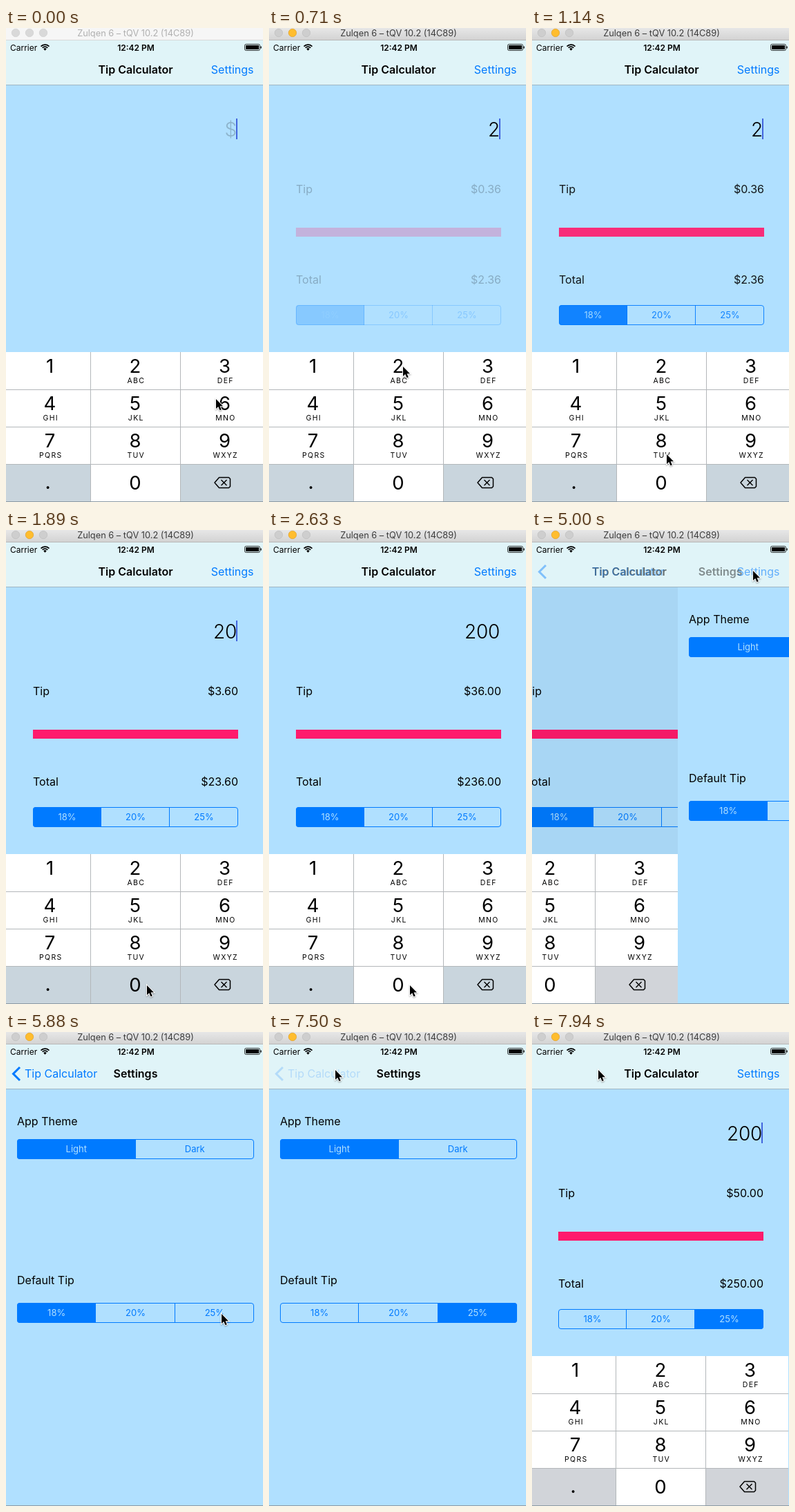
Recreate the animation shown at these times as an HTML page with a canvas. Size 372x686 px, loop 8 s.

```html
<!DOCTYPE html>
<html lang="en">
<head>
<meta charset="utf-8">
<title>Tip Calculator</title>
<style>
  html, body { margin: 0; width: 100%; height: 100%; overflow: hidden; }
  canvas { display: block; width: 372px; height: 686px; }
</style>
</head>
<body>
<canvas id="stage"></canvas>
<script>
const W = 372, H = 686, LOOP = 8000;
const canvas = document.getElementById('stage');
const ctx = canvas.getContext('2d');
const dpr = window.devicePixelRatio || 1;
canvas.width = W * dpr;
canvas.height = H * dpr;

const BG = '#b0e0ff', NAV = '#e0f4f8', BLUE = '#007aff', PINK = '#ff1b6c';

// The screen refreshes in bursts: [first, last, number of refreshes].
const bursts = [[0, 0, 1], [140, 1140, 8], [1290, 2040, 6], [2630, 2630, 1], [3070, 3070, 1],
  [3370, 4260, 7], [4560, 4710, 2], [5000, 6030, 8], [6170, 6320, 2], [6610, 7650, 8], [7790, 7940, 2]];
const refreshes = bursts.flatMap(([from, to, n]) =>
  Array.from({ length: n }, (_, i) => Math.floor((from + (to - from) * i / Math.max(1, n - 1)) / 10) * 10));

// Mouse pointer: [time, x, y]
const pointerPath = [[0, 304, 537], [280, 215, 500], [420, 194, 490], [710, 194, 490], [850, 194, 520],
  [1140, 195, 617], [1290, 202, 655], [1440, 204, 659], [3220, 204, 659], [3370, 212, 570],
  [3520, 240, 390], [3670, 275, 210], [3820, 296, 107], [3970, 312, 75], [4260, 320, 59],
  [5290, 320, 59], [5440, 318, 150], [5590, 315, 280], [5740, 312, 380], [5880, 312, 408],
  [6460, 312, 408], [6610, 302, 392], [6760, 262, 320], [6910, 205, 215], [7060, 150, 125],
  [7200, 110, 70], [7350, 96, 55], [LOOP, 96, 55]];

const during = (t, ...spans) => spans.some(([a, b]) => t >= a && t < b);
const clamp = v => Math.min(1, Math.max(0, v));

function pointerAt(t) {
  const i = Math.max(1, pointerPath.findIndex(p => p[0] >= t));
  const [t0, x0, y0] = pointerPath[i - 1], [t1, x1, y1] = pointerPath[i];
  const k = (t - t0) / (t1 - t0);
  return [Math.round(x0 + (x1 - x0) * k), Math.round(y0 + (y1 - y0) * k)];
}

// Critically damped slide, 0 to 1
function settle(ms) {
  const x = Math.max(0, ms) * 0.021;
  return 1 - (1 + x) * Math.exp(-x);
}

function rect(x, y, w, h, color) {
  ctx.fillStyle = color;
  ctx.fillRect(x, y, w, h);
}

function text(str, x, y, { size = 16, weight = 400, color = '#000', align = 'left', spacing = 0 } = {}) {
  ctx.font = `${weight} ${size}px Inter, sans-serif`;
  ctx.letterSpacing = spacing + 'px';
  ctx.textAlign = align;
  ctx.fillStyle = color;
  ctx.fillText(str, x, y);
}

function stroke(points, width, color, close = false) {
  ctx.beginPath();
  points.forEach(([x, y]) => ctx.lineTo(x, y));
  if (close) ctx.closePath();
  ctx.lineWidth = width;
  ctx.strokeStyle = color;
  ctx.stroke();
}

function group(alpha, dx, draw) {
  if (alpha <= 0.004) return;
  ctx.save();
  ctx.globalAlpha *= alpha;
  ctx.translate(dx, 0);
  draw();
  ctx.restore();
}

function segments(x, y, w, labels, selected, pressed = -1) {
  const h = 29, step = w / labels.length;
  ctx.save();
  ctx.beginPath();
  ctx.roundRect(x, y, w, h, 4);
  ctx.clip();
  labels.forEach((label, i) => {
    const left = Math.round(x + i * step), right = Math.round(x + (i + 1) * step);
    if (i === selected) rect(left, y, right - left, h, BLUE);
    if (i === pressed) rect(left, y, right - left, h, 'rgba(0,122,255,.2)');
    if (i) rect(left - 1, y, 1, h, BLUE);
    text(label, x + (i + 0.5) * step, y + 19, { size: 13, align: 'center', color: i === selected ? BG : BLUE });
  });
  ctx.restore();
  ctx.beginPath();
  ctx.roundRect(x + 0.5, y + 0.5, w - 1, h - 1, 3.5);
  ctx.lineWidth = 1;
  ctx.strokeStyle = BLUE;
  ctx.stroke();
}

function windowBar(active) {
  const shade = ctx.createLinearGradient(0, 0, 0, 17);
  shade.addColorStop(0, active ? '#e7e7e7' : '#f6f6f6');
  shade.addColorStop(1, active ? '#d3d3d3' : '#f6f6f6');
  rect(0, 0, W, 18, shade);
  rect(0, 17, W, 1, active ? '#b8b8b8' : '#d8d8d8');
  [14, 34, 54].forEach((x, i) => {
    const lit = active && i === 1;
    ctx.beginPath();
    ctx.arc(x, 7, 5.7, 0, 7);
    ctx.fillStyle = lit ? '#ffbd2e' : active ? '#cecece' : '#d9d9d9';
    ctx.fill();
    ctx.lineWidth = 0.7;
    ctx.strokeStyle = lit ? '#e0a028' : active ? '#bdbdbd' : '#cfcfcf';
    ctx.stroke();
  });
  text('Zulqen 6 – tQV 10.2 (14C89)', 187.5, 12,
    { size: 12.8, align: 'center', color: active ? '#3c3c3c' : '#b0b0b0' });
}

function statusBar() {
  text('Carrier', 6, 32.5, { size: 12 });
  text('12:42 PM', 188, 32.5, { size: 12, weight: 600, align: 'center' });
  ctx.strokeStyle = '#000';
  ctx.lineWidth = 1.7;
  [8.2, 5.2].forEach(r => {
    ctx.beginPath();
    ctx.arc(56.5, 32.3, r, -Math.PI * 0.76, -Math.PI * 0.24);
    ctx.stroke();
  });
  ctx.beginPath();
  ctx.moveTo(56.5, 32.8);
  ctx.arc(56.5, 32.3, 3, -Math.PI * 0.76, -Math.PI * 0.24);
  ctx.fillStyle = '#000';
  ctx.fill();
  ctx.beginPath();
  ctx.roundRect(345.5, 23.5, 22, 9, 2);
  ctx.lineWidth = 0.8;
  ctx.stroke();
  rect(347, 25, 19, 6, '#000');
  rect(368.5, 26.5, 1.3, 3, '#000');
}

function navBar(t, q) {
  rect(0, 18, W, 64, NAV);
  rect(0, 82, W, 1, '#9fb6c2');
  statusBar();
  group(1 - q, -108 * q, () => text('Tip Calculator', 187.5, 66, { weight: 600, align: 'center' }));
  group((1 - q) * (during(t, [4560, 5000]) ? 0.2 : 1), 0, () =>
    text('Settings', 358.5, 66, { color: BLUE, align: 'right' }));
  group(q, 150 * (1 - q), () => text('Settings', 187.5, 66, { weight: 600, align: 'center' }));
  const backAlpha = q * (t >= 7490 ? 0.2 : 1);
  group(backAlpha, 0, () => stroke([[20, 51], [10.5, 60.5], [20, 70]], 3, BLUE));
  group(backAlpha, 105 * (1 - q), () => text('Tip Calculator', 27, 66, { color: BLUE }));
}

function home(t) {
  const bill = t < 560 ? '' : t < 1590 ? '2' : t < 2040 ? '20' : '200';
  const rates = [18, 20, 25], chosen = t < 6320 ? 0 : 2;
  const money = v => '$' + v.toFixed(2);
  const tip = bill * rates[chosen] / 100;
  text(bill || '$', 334, 156.5,
    { size: 28, weight: 300, align: 'right', color: bill ? '#000' : '#8db3cb', spacing: -0.3 });
  if (!during(t, [2630, 3070], [3660, 4110], [4710, 7550])) rect(333, 131, 2, 30, '#4265dd');
  group(clamp((t - 560) / 640), 0, () => {
    text('Tip', 39, 239);
    text(money(tip), 336, 239, { align: 'right' });
    rect(39, 289, 297, 13, PINK);
    text('Total', 39, 369.5);
    text(money(+bill + tip), 336, 369.5, { align: 'right' });
    segments(39, 401, 297, rates.map(r => r + '%'), chosen);
  });
}

function settings(t) {
  rect(0, 83, W, H - 83, BG);
  text('App Theme', 16, 134.5);
  segments(16, 155, 343, ['Light', 'Dark'], 0);
  text('Default Tip', 16, 364.5);
  segments(16, 392, 343, ['18%', '20%', '25%'], t < 6320 ? 0 : 2, during(t, [6170, 6320]) ? 2 : -1);
}

function keyboard(t, sliding) {
  const lefts = [0, 123, 253, W], centers = [63.5, 187, 316.5];
  const letters = ['', 'ABC', 'DEF', 'GHI', 'JKL', 'MNO', 'PQRS', 'TUV', 'WXYZ'];
  const gray = sliding ? '#d1d4d9' : '#c9d5dd';
  const pressed = during(t, [420, 560]) ? '2' : during(t, [1440, 1590], [1890, 2040]) ? '0' : '';
  rect(0, 469, W, 217, '#fff');
  [...'123456789.0<'].forEach((key, i) => {
    const col = i % 3, y = 469 + 54 * Math.floor(i / 3), cx = centers[col];
    const special = key === '.' || key === '<';
    if (special || key === pressed) rect(lefts[col], y, lefts[col + 1] - lefts[col], 54, gray);
    if (key === '<') return;
    if (key === '.') return text('.', 60.5, 667, { size: 27, weight: 500, align: 'center' });
    text(key, cx, y + (key === '0' ? 199 - 162 - 0.5 + 0.5 : 30), { size: 27.5, align: 'center' });
    if (letters[i]) text(letters[i], cx + 1.3, y + 45, { size: 10.5, align: 'center', spacing: 1.3 });
  });
  [523, 577, 631].forEach(y => rect(0, y, W, 1, '#b3b7ba'));
  [122, 252].forEach(x => rect(x, 469, 1, 216, '#b3b7ba'));
  ctx.lineJoin = 'round';
  stroke([[302, 658], [308.5, 650.5], [322.5, 650.5], [324.5, 652.5], [324.5, 663.5], [322.5, 665.5], [308.5, 665.5]],
    1.5, '#000', true);
  stroke([[311.5, 654], [319.5, 662]], 1.5, '#000');
  stroke([[319.5, 654], [311.5, 662]], 1.5, '#000');
  ctx.lineJoin = 'miter';
}

function pointer(x, y) {
  ctx.save();
  ctx.translate(x, y);
  ctx.shadowColor = 'rgba(0,0,0,.35)';
  ctx.shadowBlur = 2 * dpr;
  ctx.shadowOffsetY = dpr;
  stroke([[0, 0], [0, 14], [3.2, 11], [5.5, 16.3], [7.8, 15.3], [5.6, 10.2], [10, 10.2]], 2, '#fff', true);
  ctx.shadowColor = 'transparent';
  ctx.fillStyle = '#000';
  ctx.fill();
  ctx.restore();
}

function render(t) {
  const q = t < 7550 ? settle(t - 4930) : 1 - settle(t - 7550);
  ctx.setTransform(dpr, 0, 0, dpr, 0, 0);
  rect(0, 0, W, H, BG);
  group(1, Math.floor(-112 * q), () => home(t));
  if (q > 0) {
    rect(0, 83, W, H - 83, `rgba(0,0,0,${0.1 * q})`);
    group(1, Math.round(W * (1 - q)), () => settings(t));
  }
  group(1, Math.floor(-W * q), () => keyboard(t, q > 0));
  navBar(t, q);
  windowBar(t >= 420);
  rect(0, 685, W, 1, '#8d9ba5');
  pointer(...pointerAt(t));
}

const start = performance.now();
function tick() {
  const now = (performance.now() - start) % LOOP;
  render(refreshes.findLast(r => r <= now));
  requestAnimationFrame(tick);
}
tick();
</script>
</body>
</html>
```
